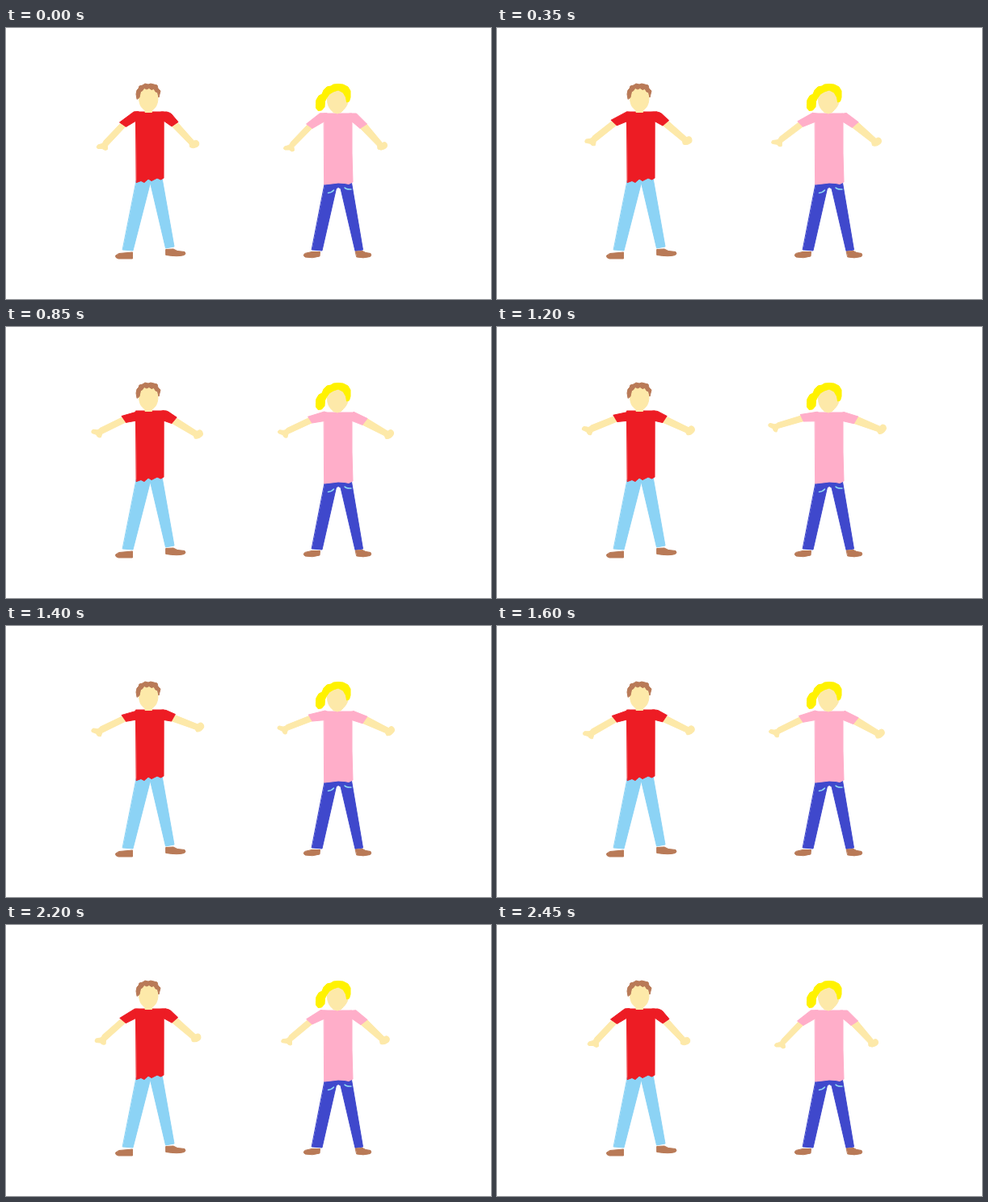
An HTML page with a canvas for the animation above (2500 ms loop, 600x336 px).

```html
<!DOCTYPE html>
<html lang="en">
<head>
<meta charset="utf-8">
<title>Arm raises</title>
<style>
  html, body { margin: 0; width: 100%; height: 100%; overflow: hidden; background: #fff; }
  canvas { display: block; width: 600px; height: 336px; }
</style>
</head>
<body>
<canvas id="stage" width="600" height="336"></canvas>
<script>
const ctx = document.getElementById('stage').getContext('2d');
const LOOP = 2500, STEP = 50, REST = 2450;
const SKIN = '#fde9a9', BROWN = '#b97a57', RED = '#ed1c24', PINK = '#ffaec9';
const SKY = '#8cd3f5', INDIGO = '#3f48cc', YELLOW = '#fff200';

const shape = (color, d) => ({ color, path: new Path2D(d) });

// Each arm swings by `swing` degrees around its pivot, highest at time `peak`.
const man = {
  arms: [
    { pivot: [160, 121], swing: 26.5, peak: 1100, parts: [
      shape(SKIN, 'M141 119L121 140Q120 144 117 144L113.5 145Q111 148 113.5 149.5L119 149.5Q123 153 125.5 150.5L125.5 146L148 122Z'),
      shape(RED, 'M158 104L140.5 117L148.5 122.5L161 115L164 104Z')
    ] },
    { pivot: [196, 121], swing: -26, peak: 1400, parts: [
      shape(SKIN, 'M213 118L232.5 140Q237 138 238.5 142Q239.5 146 236 147.5Q231 150 227.5 147.5L227 144L205.5 122Z'),
      shape(RED, 'M192 104L199 104Q203 105 205 107L213 116.5L205 122L195 115Z')
    ] }
  ],
  body: [
    shape(SKY, 'M161.5 189L193 186L208 271L197.5 273L178.5 192L157 276L144.5 275Z'),
    shape(BROWN, 'M140 279.5L156.5 278L156.5 286L139 286Q135 285 135.5 282.5Z'),
    shape(BROWN, 'M198 274.5L207 274L212 276.5L221 277.5Q223 280 220.5 281.5Q213 284 198 281.5Z'),
    shape(RED, 'M160.8 104L195.2 104L195 186L191.5 188L187 186L180 189.5L176 187L171 191.5L167 189.5L161.5 191.5Z'),
    shape(SKIN, 'M164.5 86C164.5 69 187.5 69 188 86C188 95 184.5 100 180.5 102L180.5 104.5L172 104.5L172 102C167 99 164.5 94 164.5 86Z'),
    shape(BROWN, 'M162 88L161 82L162 77L164 75L165 72L169 71L172 69L176 70L179 69L183 70L187 71L188 75L191 78L190 82L189 86L187.5 80L185 79L183 75.5L180 76.5L177 74.5L174 76L171 74.5L168.5 78L166.5 79L165 86Z')
  ]
};

const woman = {
  arms: [
    { pivot: [393.5, 121], swing: 29.5, peak: 1200, parts: [
      shape(SKIN, 'M373 120L352.5 141.5Q351 146 348 146L344.5 147Q342 150 345 151L350.5 151Q354 154.5 356.5 152L356 147.5L379 124Z'),
      shape(PINK, 'M388 106L371.5 119L379 124.5L393.5 116L397 106Z')
    ] },
    { pivot: [430, 115], swing: -27, peak: 1200, parts: [
      shape(SKIN, 'M446 119L465.5 142.5Q470 140 471.5 144.5Q472 148 469 149.5Q464 152.5 460 150L459.5 146L438 124Z'),
      shape(PINK, 'M425 106L433.5 106L446.5 119L438 124.5L428 116Z')
    ] }
  ],
  body: [
    shape(INDIGO, 'M394.5 193L427.5 192L441.5 275L432 276.5L414 199L411 197.5L408.5 199L391 276L378.5 275Z'),
    shape(BROWN, 'M378.5 277.5L388.5 277.5L388 283Q379 286 370 284Q366.5 281.5 370 279.5Z'),
    shape(BROWN, 'M432.5 277L441 276.5L445 278.5L451 279.5Q452.5 282 450.5 283.5Q442 286 434 284Z'),
    shape(PINK, 'M393.5 106L428 106L428 155L429 191L424 193.5L419 192.5L411 192L403 193L394 194Z'),
    shape(SKIN, 'M397.5 88C397.5 72 424 72 423.5 88C423.5 96 418 101 414.5 104.5L410 106L405 104.5C400 100 397.5 96 397.5 88Z'),
    shape(YELLOW, 'M384 89L387 84L391 82L393 77L397 73L402 72L405 70L411 69.5L417 70L423 73L426 78L426 86L424.5 91L421.5 92L420.5 86L417 80L411 77L405 79L400 82L396.5 87L394.5 91L394 98L390.5 102L386 102.5L383.5 99L383.5 94Z')
  ]
};

const pockets = new Path2D('M398.5 204.5Q403 204 405.5 201M419 198Q421 200.5 427 200');

function drawShape({ color, path }) {
  ctx.fillStyle = ctx.strokeStyle = color;
  ctx.fill(path);
  ctx.stroke(path);
}

function drawArm({ pivot: [x, y], swing, peak, parts }, time) {
  const raise = time < peak ? time / peak : (REST - time) / (REST - peak);
  ctx.save();
  ctx.translate(x, y);
  ctx.rotate(swing * raise * Math.PI / 180);
  ctx.translate(-x, -y);
  parts.forEach(drawShape);
  ctx.restore();
}

function drawPerson({ arms, body }, time) {
  arms.forEach(arm => drawArm(arm, time));
  body.forEach(drawShape);
}

function render(now) {
  const time = Math.floor((now % LOOP) / STEP) * STEP;
  ctx.fillStyle = '#fff';
  ctx.fillRect(0, 0, 600, 336);
  ctx.lineWidth = 1;
  ctx.lineJoin = ctx.lineCap = 'round';
  drawPerson(man, time);
  drawPerson(woman, time);
  ctx.strokeStyle = '#8fd9f0';
  ctx.lineWidth = 1.5;
  ctx.stroke(pockets);
}

const start = performance.now();
function tick() {
  render(performance.now() - start);
  requestAnimationFrame(tick);
}
tick();
</script>
</body>
</html>
```
